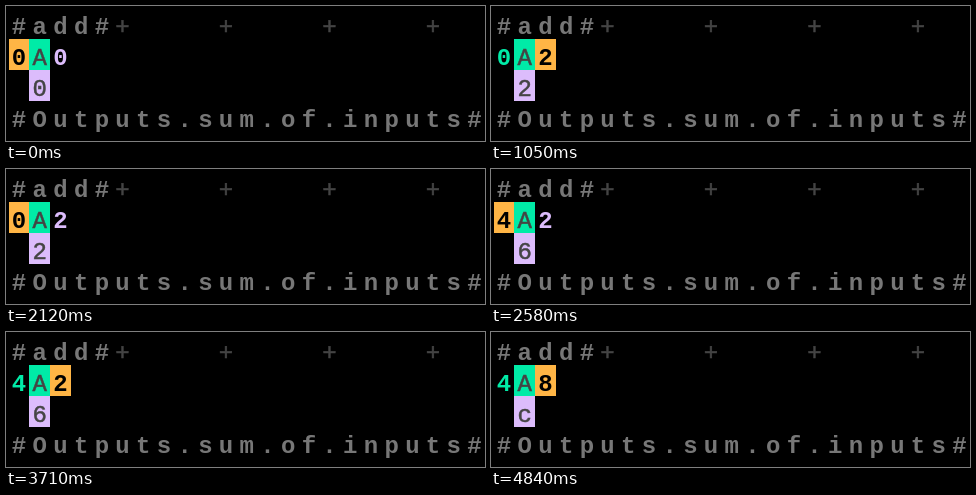
These frames come from a looping animation (479 by 135 pixels, 5370 ms). An HTML page:

```html
<!DOCTYPE html>
<html lang="en">
<head>
<meta charset="utf-8">
<title>Add operator</title>
<style>
  html, body { margin: 0; width: 100%; height: 100%; overflow: hidden; background: #000; }
  svg { display: block; width: 479px; height: 135px; }
  text {
    font: bold 24px "Liberation Mono", "DejaVu Sans Mono", monospace;
    text-anchor: middle;
  }
  text[fill="#444"] { font-weight: normal; stroke: #444; stroke-width: 0.5px; }
</style>
</head>
<body>
<svg id="stage" viewBox="0 0 479 135"></svg>
<script>
const LOOP = 5370;
const CELL_W = 20.7, CELL_H = 31, LEFT = 2.7, TOP = 2, BASE = 26;
const BLACK = "#000", LOW = "#444", MID = "#777";
const GREEN = "#00eba7", LILAC = "#dcbcfc", ORANGE = "#ffb545";

// time, cursor column, left input, right input, output
const steps = [
  [0, 0, "0", "0", "0"],
  [460, 1, "0", "0", "0"],
  [590, 2, "0", "0", "0"],
  [1050, 2, "0", "2", "2"],
  [1780, 1, "0", "2", "2"],
  [2120, 0, "0", "2", "2"],
  [2580, 0, "4", "2", "6"],
  [3440, 1, "4", "2", "6"],
  [3710, 2, "4", "2", "6"],
  [4770, 2, "4", "8", "6"],
  [4840, 2, "4", "8", "c"]
];

const stage = document.getElementById("stage");

function add(tag, attrs) {
  const el = document.createElementNS("http://www.w3.org/2000/svg", tag);
  for (const key in attrs) el.setAttribute(key, attrs[key]);
  return stage.appendChild(el);
}

function glyph(col, row, char, color) {
  const el = add("text", {
    x: LEFT + (col + 0.5) * CELL_W,
    y: TOP + BASE + row * CELL_H,
    fill: color
  });
  el.textContent = char;
  return el;
}

function cell(col, row) {
  const x = Math.round(LEFT + col * CELL_W);
  const right = Math.round(LEFT + (col + 1) * CELL_W);
  const box = add("rect", {
    x, y: TOP + row * CELL_H, width: right - x, height: CELL_H
  });
  const label = glyph(col, row, "", BLACK);
  return (char, color, back) => {
    label.textContent = char;
    label.setAttribute("fill", color);
    box.setAttribute("fill", back);
  };
}

function line(row, str) {
  [...str].forEach((char, col) => glyph(col, row, char, MID));
}

line(0, "#add#");
line(3, "#Outputs.sum.of.inputs#");
for (let col = 5; col <= 20; col += 5) glyph(col, 0, "+", LOW);

const inputs = [0, 1, 2].map(col => cell(col, 1));
const output = cell(1, 2);
const styles = [[GREEN, "none"], [LOW, GREEN], [LILAC, "none"]];
let shown = null;

function draw(now) {
  const time = now % LOOP;
  const step = steps.findLast(s => s[0] <= time);
  if (step !== shown) {
    shown = step;
    const [, cursor, left, right, sum] = step;
    [left, "A", right].forEach((char, col) => {
      const [color, back] = col === cursor ? [BLACK, ORANGE] : styles[col];
      inputs[col](char, color, back);
    });
    output(sum, LOW, LILAC);
  }
}

const start = performance.now();
function tick() {
  draw(performance.now() - start);
  requestAnimationFrame(tick);
}
tick();
</script>
</body>
</html>
```
